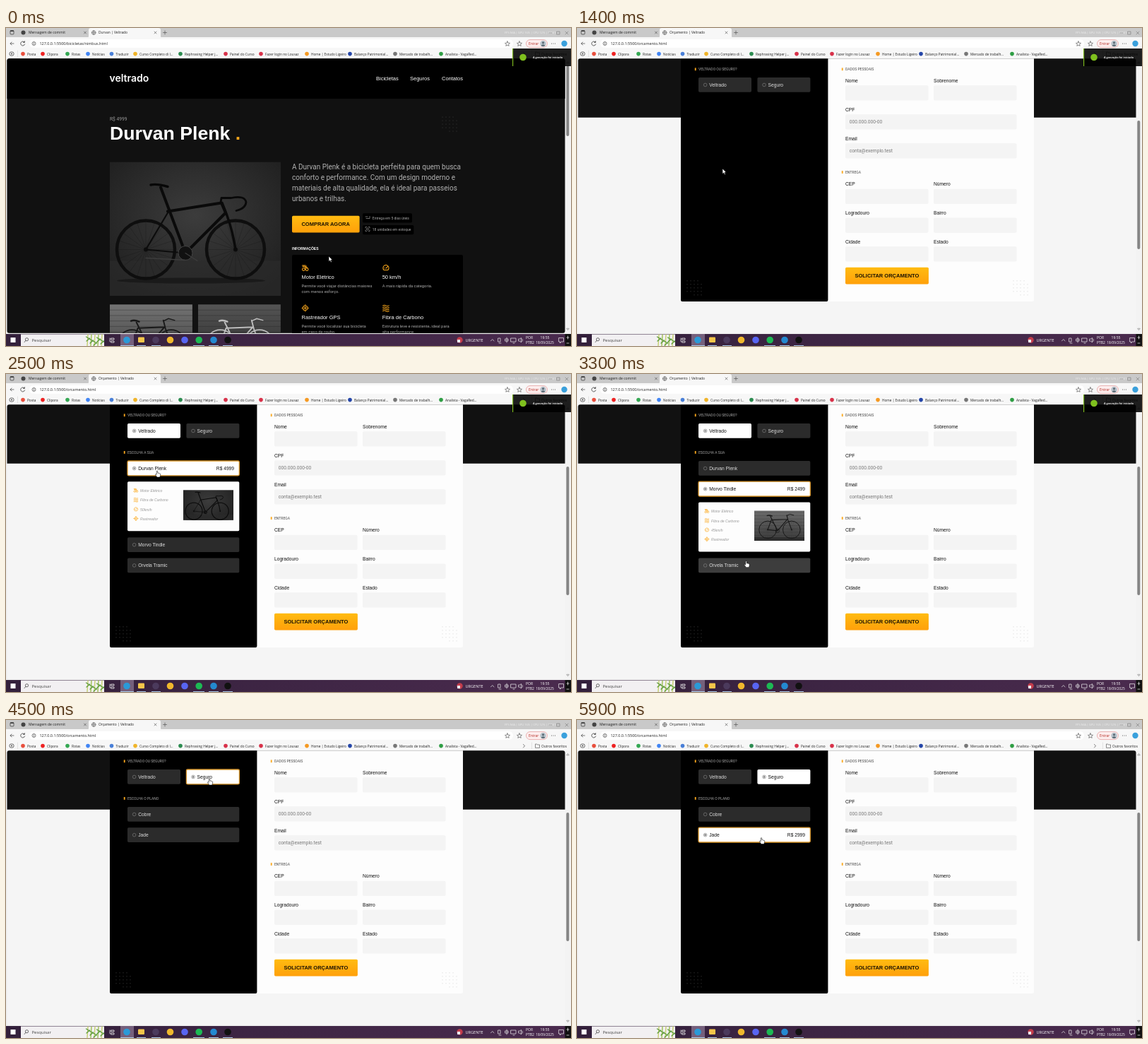
These frames come from a looping animation (800x450 px, 6 s). An HTML page:

```html
<!DOCTYPE html>
<html lang="pt-BR">
<head>
<meta charset="utf-8">
<title>Veltrado</title>
<style>
html, body { margin: 0; width: 100%; height: 100%; overflow: hidden; background: #f5f5f5; }
svg { display: block; width: 800px; height: 450px; }
svg svg { width: auto; height: auto; }
text { white-space: pre; }
.a { font-family: "Liberation Sans", Arial, sans-serif; }
.r { font-family: Roboto, sans-serif; }
.u { font-family: "Open Sans", sans-serif; }
.l { font-family: Inter, sans-serif; }
.b { font-weight: 700; }
.i { font-style: italic; }
</style>
</head>
<body>
<svg id="stage" viewBox="0 0 800 450"></svg>
<script>
const LOOP = 6000, TICK = 100, SCROLL = 166.7;
const GOLD = '#fba81c';

const rect = (x, y, w, h, fill, r = 0, more = '') =>
  `<rect x="${x}" y="${y}" width="${w}" height="${h}" rx="${r}" fill="${fill}" ${more}/>`;
const circ = (x, y, r, fill, more = '') => `<circle cx="${x}" cy="${y}" r="${r}" fill="${fill}" ${more}/>`;
const line = (d, color, w = 0.7, more = '') =>
  `<path d="${d}" fill="none" stroke="${color}" stroke-width="${w}" stroke-linecap="round" stroke-linejoin="round" ${more}/>`;
const text = (x, y, size, cls, fill, s, more = '') =>
  `<text x="${x}" y="${y}" font-size="${size}" class="${cls}" fill="${fill}" ${more}>${s}</text>`;
const at = (x, y, s, body) => `<g transform="translate(${x} ${y}) scale(${s})">${body}</g>`;

function dots(x, y, color) {
  let s = '';
  for (let r = 0; r < 5; r++)
    for (let c = 0; c < 5; c++)
      if (Math.abs(r - c) < 4 && !(r === 4 && c < 2)) s += circ(x + c * 5, y + r * 5, 0.55, color);
  return s;
}

// Small line icons: motor, speed, tracker, carbon
const GLYPHS = [
  'M1 2H6M3.5 2V4H6L9 6M1.5 4H3.5M1 8A2 2 0 1 0 5 8A2 2 0 1 0 1 8M6 8A2 2 0 1 0 10 8A2 2 0 1 0 6 8M5 6L7 3',
  'M2.5 9A4.3 4.3 0 1 1 8.5 9ZM5.5 6.5L8 3.8M3 6H3.4',
  'M2 5.5A3.5 3.5 0 1 0 9 5.5A3.5 3.5 0 1 0 2 5.5M5.5 .5V2M5.5 9V10.5M.5 5.5H2M9 5.5H10.5M4.3 5.5A1.2 1.2 0 1 0 6.7 5.5A1.2 1.2 0 1 0 4.3 5.5',
  'M1 2Q3.2 .5 5.5 2T10 2M1 4.7Q3.2 3.2 5.5 4.7T10 4.7M1 7.4Q3.2 5.9 5.5 7.4T10 7.4M1 10Q3.2 8.5 5.5 10T10 10'
];
const glyph = (n, x, y, s) => at(x, y, s, line(GLYPHS[n], GOLD, 1.1));

function wheel(x, y, r, color, w) {
  let d = '';
  for (let k = 0; k < 20; k++) {
    const a = k * Math.PI / 10;
    d += `M${x} ${y}L${(x + r * Math.cos(a)).toFixed(1)} ${(y + r * Math.sin(a)).toFixed(1)}`;
  }
  return line(d, color, 0.35, 'opacity=".6"') + circ(x, y, r, 'none', `stroke="${color}" stroke-width="${w}"`) + circ(x, y, 3, color);
}

const roadBike = rect(0, 0, 242, 190, 'url(#studio)') + rect(0, 140, 242, 50, '#2c2c2c', 0, 'opacity=".6"') +
  '<ellipse cx="115" cy="168" rx="105" ry="4" fill="#151515" opacity=".7"/>' +
  wheel(51, 124, 41, '#0e0e0e', 4.5) + wheel(178, 124, 41, '#0e0e0e', 4.5) +
  line('M51 124L82 72M51 124L107 129', '#0c0c0c', 2.2) +
  line('M72 36L107 129L164 72L158 58L82 70', '#0a0a0a', 4) + line('M159 58L166 76Q174 98 178 124', '#0a0a0a', 3.5) +
  line('M58 32.5Q66 30.5 82 35', '#070707', 3.4) +
  line('M157 57L158 51L172 51Q191 47 193 57Q192 66 179 69', '#090909', 2.8) +
  circ(107, 129, 10, '#111', 'stroke="#444" stroke-width="1"') + line('M107 129L124 140M51 136L107 139', '#3c3c3c', 1.3);

function cityBike(color, wall) {
  let boards = '';
  for (let y = -24; y < 150; y += 16) boards += `M0 ${y}H242`;
  return rect(0, -30, 242, 190, wall) + rect(0, -30, 242, 190, 'url(#shade)') + line(boards, '#222', 1.2, 'opacity=".6"') +
    rect(0, 128, 242, 34, '#2e2e2e') +
    wheel(65, 92, 42, color, 3.4) + wheel(180, 92, 42, color, 3.4) +
    line('M65 92L82 45L160 42L112 97ZM78 28L112 97M157 22L163 46L180 92', color, 4) +
    line('M62 24Q72 20 86 26', color, 5) + line('M157 24L172 17L190 22', color, 3.2) + circ(112, 97, 9, 'none', `stroke="${color}" stroke-width="2.5"`);
}
const darkBike = cityBike('#191919', '#757575'), lightBike = cityBike('#bdbdbd', '#555');
const photo = (x, y, w, h, s, dy, body) =>
  `<svg x="${x}" y="${y}" width="${w}" height="${h}" style="width:${w}px;height:${h}px">${at(0, dy, s, body)}</svg>`;

const nav = rect(0, 43, 800, 57, '#000') + text(146.5, 75.6, 14, 'l', '#fff', 'veltrado', 'font-weight="600"') +
  [['Bicicletas', 524], ['Seguros', 572], ['Contatos', 617]].map(([s, x]) => text(x, 74.4, 7.5, 'a', '#fff', s)).join('');

const orangeButton = (x, y, w, s) => rect(x, y, w, 23.8, 'url(#gold)', 1.7) + text(x + 13.4, y + 14.5, 7.5, 'a b', '#1c1403', s);

function productPage() {
  const intro = ['A Durvan Plenk é a bicicleta perfeita para quem busca', 'conforto e performance. Com um design moderno e',
    'materiais de alta qualidade, ela é ideal para passeios', 'urbanos e trilhas.'];
  const facts = [
    [0, 418.5, 334, 'Motor Elétrico', 'Permite você viajar distâncias maiores', 'com menos esforço.'],
    [1, 532.7, 334, '50 km/h', 'A mais rápida da categoria.', ''],
    [2, 418.5, 391, 'Rastreador GPS', 'Permite você localizar sua bicicleta', 'em caso de roubo.'],
    [3, 532.7, 391, 'Fibra de Carbono', 'Estrutura leve e resistente, ideal para', 'alta performance.']];
  const pill = (y, w, s, d) => rect(505, y, w, 13.2, '#000', 1.7) + line(d, '#999', 0.7) + text(518.8, y + 8.4, 5, 'r', '#aaa', s);
  return rect(0, 43, 800, 400, '#111') + nav + text(147, 130.8, 6.67, 'r', '#999', 'R$ 4999') +
    text(147, 158.4, 26.67, 'a b', '#fff', `Durvan Plenk <tspan fill="${GOLD}">.</tspan>`) + dots(618, 126, '#3d3d3d') +
    photo(147, 189.5, 242, 189.5, 1, 0, roadBike) +
    photo(147, 391, 117, 60, 0.483, 12, darkBike) + photo(272, 391, 117, 60, 0.483, 12, lightBike) +
    intro.map((s, i) => text(405, 200 + i * 15, 10, 'r', '#b2b2b2', s)).join('') +
    orangeButton(405, 265.7, 95.6, 'COMPRAR AGORA') +
    pill(262.3, 70, 'Entrega em 5 dias úteis', 'M509 267H512M510 269.5H515V266.5') +
    pill(279, 72.3, '18 unidades em estoque', 'M509 283V281.5H510.5M513.5 281.5H515V283M515 286V287.5H513.5M510.5 287.5H509V286M510.5 284.5A1.5 1.5 0 1 0 513.5 284.5A1.5 1.5 0 1 0 510.5 284.5') +
    text(405, 314, 5, 'a b', '#fff', 'INFORMAÇÕES') + rect(405, 321, 242, 130, '#000', 2) +
    facts.map(([n, x, y, h, p, q]) => glyph(n, x, y, 0.95) + text(x, y + 21, 7.5, 'a', '#fff', h) +
      text(x, y + 33, 5.83, 'r', '#aaa', p) + text(x, y + 41.3, 5.83, 'r', '#aaa', q)).join('');
}

const section = (x, y, s, color) => rect(x - 5.2, y - 1.9, 1.8, 3.8, GOLD) + text(x, y + 1.8, 5, 'r', color, s);
const field = (x, y, w, label, hint = '') => text(x, y - 4.3, 6.67, 'a', '#111', label) +
  rect(x, y, w, 21.2, '#f4f4f4', 1.7) + text(x + 5.8, y + 12.9, 6.67, 'r', '#777', hint);

function formPage() {
  const L = 380, R = 505, W = 117.5, F = 242.5;
  return rect(0, 43, 800, 800, '#f5f5f5') + rect(0, 43, 800, 250.4, '#111') + nav +
    text(147, 136, 10, 'r', '#999', 'COTAÇÕES NO SEU EMAIL', 'letter-spacing=".12"') +
    text(147, 165.6, 26.67, 'a b', '#fff', `Solicite um Orçamento<tspan fill="${GOLD}">.</tspan>`) + dots(618, 126, '#3d3d3d') +
    rect(147, 196.7, 500, 357, '#fdfdfd', 2) + rect(147, 196.7, 208.4, 357, '#000', 2) +
    section(L, 225, 'DADOS PESSOAIS', '#444') +
    field(L, 248, W, 'Nome') + field(R, 248, W, 'Sobrenome') +
    field(L, 289, F, 'CPF', '000.000.000-00') + field(L, 330, F, 'Email', 'conta@exemplo.test') +
    section(L, 370.7, 'ENTREGA', '#444') +
    field(L, 394.4, W, 'CEP') + field(R, 394.4, W, 'Número') +
    field(L, 435.2, W, 'Logradouro') + field(R, 435.2, W, 'Bairro') +
    field(L, 476, W, 'Cidade') + field(R, 476, W, 'Estado') +
    orangeButton(L, 505.4, 117.9, 'SOLICITAR ORÇAMENTO') +
    dots(156, 524.5, '#4a4a4a') + dots(618, 524.5, '#cfcfcf') + '<g id="choices"></g>';
}

const bookmarks = [
  [30, 'Posta', '#e8503e'], [58, 'Clipora', '#e22'], [93, 'Rotas', '#34a853'], [122, 'Notícias', '#4285f4'], [155.5, 'Traduzir', '#4a80d8'],
  [189, 'Curso Completo di I...', '#f0b429'], [253, 'Rephrasing Helper j...', '#2c8c50'], [317, 'Painel do Curso', '#d8324a'],
  [367, 'Fazer login no Lousaz', '#d8324a'], [432, 'Home | Estudo Ligeiro', '#f59a23'], [493, 'Balanço Patrimonial...', '#2546a8'],
  [557, 'Mercado de trabalh...', '#777'], [622, 'Analista - VagaRed...', '#2f9e44']];

function browser() {
  const ink = '#444';
  return rect(0, 0, 800, 14, '#c9c9c9') + rect(0, 13, 800, 31, '#f7f7f7') + rect(0, 43, 2, 390, '#eee') + rect(0, 431, 800, 2.5, '#eee') +
    rect(6, 3.5, 5, 5.5, 'none', 1, `stroke="${ink}" stroke-width=".8"`) + rect(6, 3.5, 5, 1.5, ink) +
    circ(24.5, 6.5, 3, '#444') + text(32, 8.4, 5, 'u', '#222', 'Mensagem de commit') + line('M110.5 5L113.5 8M113.5 5L110.5 8', ink, 0.6) +
    '<path d="M115 14Q117 14 117 11V3Q117 0 120 0H216Q219 0 219 3V11Q219 14 221 14Z" fill="#f7f7f7"/>' +
    circ(124.2, 6.6, 2.8, 'none', `stroke="${ink}" stroke-width=".6"`) + line('M121.4 6.6H127M124.2 3.8Q121.8 6.6 124.2 9.4Q126.6 6.6 124.2 3.8', ink, 0.5) +
    '<text id="tab" x="131" y="8.4" font-size="4.9" class="u" fill="#222"></text>' +
    line('M210 5L213 8M213 5L210 8M222.5 6.5H227.5M225 4V9', ink, 0.6) +
    text(706, 8.3, 4, 'u', '#eee', 'FPS N/A | GPU 16% | CPU 12% | RAM 5') +
    line('M769 7H773M780 5H784V9H780ZM792 5L796 9M796 5L792 9', '#777', 0.6) +
    line('M11 22H6M8 20L6 22L8 24', '#555', 0.8) + line('M26 20A3 3 0 1 0 26.6 23M26.3 18.7V20.4H24.6', '#333', 0.8) +
    rect(33, 16, 685, 12, '#fff', 6) + circ(39.5, 22, 2.5, 'none', `stroke="${ink}" stroke-width=".7"`) + line('M39.5 21.8V23.3M39.5 20.6V20.7', ink, 0.7) +
    '<text id="url" x="47.5" y="24.1" font-size="5.45" class="u" fill="#222"></text>' +
    line('M710 18.8L711 21.2L713.5 21.4L711.6 23L712.2 25.4L710 24.1L707.8 25.4L708.4 23L706.5 21.4L709 21.2ZM727 18.8L728 21.2L730.5 21.4L728.6 23L729.2 25.4L727 24.1L724.8 25.4L725.4 23L723.5 21.4L726 21.2Z', ink, 0.6) +
    rect(736.5, 16.6, 30, 11, '#fdeeee', 5.5, 'stroke="#d88" stroke-width=".6"') + text(740, 24, 5, 'u', '#b3261e', 'Entrar') +
    circ(760.5, 22.1, 4.3, '#b9c4cc') + circ(760.5, 20.8, 1.6, '#5c6a75') + '<path d="M757.5 25Q760.5 21.5 763.5 25Q760.5 27 757.5 25" fill="#5c6a75"/>' +
    [772.5, 775, 777.5].map(x => circ(x, 22, 0.55, ink)).join('') + circ(790.5, 22, 4.2, '#3aa0dc') +
    rect(5, 34, 6, 5, 'none', 2, `stroke="${ink}" stroke-width=".8"`) + circ(8, 36.5, 1, ink) + line('M16.5 32V41', '#ccc', 0.5) +
    bookmarks.map(([x, s, c]) => circ(x - 6, 36.6, 2.8, c) + text(x, 38.5, 4.75, 'u', '#222', s)).join('') +
    line('M732.5 34.5L734.5 36.7L732.5 39', ink, 0.7) + line('M744.5 32V41', '#ccc', 0.5) +
    line('M749.5 39V34H751.5L752.5 35H755.5V39Z', ink, 0.6) + text(758, 38.5, 4.75, 'u', '#222', 'Outros favoritos') +
    rect(791, 43, 9, 389, '#f3f3f3') + line('M794 49.5L795.5 47.5L797 49.5ZM794 425.5L795.5 427.5L797 425.5Z', '#777', 0.6) +
    '<rect id="thumb" x="793.3" width="4" rx="2" fill="#858585"/>';
}

function taskbar() {
  const w = '#eee';
  let leaves = '';
  for (let k = 0; k < 5; k++) {
    const x = 116 + k * 5, y = 437 + k * 3 % 8;
    leaves += line(`M${x} 434L${x - 1} 449.5`, k % 2 ? '#9cbf52' : '#c3cf6c', 1.4) + line(`M${x - 2.5} ${y}L${x + 2.5} ${y + 3}M${x + 2.5} ${y + 2}L${x - 2} ${y + 6}`, '#5a9a3a', 1.2);
  }
  return rect(0, 433, 800, 17, 'url(#bar)') + rect(6.5, 438, 7, 7, '#fff') + rect(21, 433.5, 118, 16.5, '#f2f0f2') +
    circ(29.5, 440.7, 2.1, 'none', 'stroke="#333" stroke-width=".7"') + line('M28 442.3L26 444.6', '#333') +
    text(36.5, 444, 6, 'u', '#444', 'Pesquisar') + leaves +
    line('M147 439V444M149 439H153V441H149ZM149 443H153V445H149Z', w, 0.8) +
    rect(162, 433, 19, 17, '#75607c') + rect(187, 437.5, 9, 7.5, '#f5c64a', 1) +
    [[171, '#2a9ad8'], [212, '#4b3a5c'], [232.5, '#f0b82d'], [253, '#5865f2'], [273.2, '#1db954'], [294, '#2489d0'], [314, '#111']]
      .map(([x, c]) => circ(x, 441.5, 4.8, c)).join('') +
    [[162, 19], [185, 13], [206, 13], [265, 16], [287, 14], [307, 14]].map(([x, l]) => rect(x, 449, l, 1, '#a9c8e6')).join('') +
    circ(642.5, 441.5, 4.2, '#c33d4c') + rect(639, 441, 4, 4, '#e9eef7') + text(650.5, 443.9, 5.6, 'u', '#fff', 'URGENTE') +
    line('M686.5 442.8L688.7 440.5L691 442.8M697 439H700V444H697ZM698 446H701M709 438V445M707 440H711V443H707ZM715 439H722V444H715ZM718 446H720M726 440H727.5L729.5 438.5V445L727.5 443H726ZM731 440Q732.4 441.7 731 443.5', w, 0.7) +
    text(736, 440.3, 5, 'u', '#fff', 'POR') + text(736, 447.4, 5, 'u', '#fff', 'PTB2') +
    text(763, 440.3, 5, 'u', '#fff', '19:55', 'text-anchor="middle"') + text(763, 447.4, 4.8, 'u', '#fff', '18/09/2025', 'text-anchor="middle"') +
    line('M783 438.5H789.5V444H786L784.5 446V444H783Z', w, 0.7) + rect(791.5, 433, 8.5, 17, '#111') +
    line('M795.5 436V440M794 438H797M794 446H797', '#ddd', 0.8);
}

const toast = rect(717, 29, 83, 25, '#000', 0, 'opacity=".88"') + rect(717, 29, 1.2, 25, '#7ab51d') +
  circ(732, 41.5, 4.8, '#7fc01e') + text(746, 43, 3.9, 'u', '#fff', 'A gravação foi iniciada', 'font-weight="600"');

const stage = document.getElementById('stage');
const grad = (id, a, b, dir) => `<linearGradient id="${id}" ${dir}><stop stop-color="${a}"/><stop offset="1" stop-color="${b}"/></linearGradient>`;
const down = 'x1="0" y1="0" x2="0" y2="1"';
stage.innerHTML = '<defs>' + grad('gold', '#ffbb11', '#ffa00a', down) + grad('shade', '#0000', '#0008', down) +
  grad('bar', '#33203b', '#4a2b4e', '') +
  '<radialGradient id="studio" cy=".4" r=".7"><stop stop-color="#3c3c3c"/><stop offset="1" stop-color="#1e1e1e"/></radialGradient>' +
  '<clipPath id="view"><rect x="1.5" y="43.2" width="790" height="388.5" rx="3"/></clipPath></defs>' + browser() +
  `<g clip-path="url(#view)"><g id="product">${productPage()}</g><g id="form">${formPage()}</g></g>` +
  taskbar() + `<g id="toast">${toast}</g><g id="pointer"></g>`;
const $ = id => document.getElementById(id);

const bikes = [['Durvan Plenk', 4999, 50, roadBike], ['Morvo Tindle', 2499, 45, darkBike], ['Orvela Tramic', 3999, 40, lightBike]];
const plans = [['Cobre', 1999], ['Jade', 2999]];

// Clicks: time, kind (0 bike, 1 insurance), chosen item
const clicks = [[0, -1, -1], [1800, 0, -1], [2400, 0, 0], [2900, 0, 1], [3600, 0, 2], [4500, 1, -1], [5200, 1, 0], [5700, 1, 1]];

const path = [[0, 457, 323], [300, 452, 281], [500, 452, 280], [800, 298.5, 297.5], [1400, 206, 199], [1700, 204, 83], [1900, 204, 83],
  [2300, 214, 137], [2500, 214, 137], [2800, 224, 240], [3000, 226, 241], [3400, 242, 269], [3900, 243.3, 268], [4400, 288, 84],
  [4600, 288, 82], [5000, 284, 130], [5200, 284, 130.5], [5600, 262, 163], [5900, 261, 166.5], [6000, 261, 166.5]];

const smooth = k => k * k * (3 - 2 * k);
const clamp = k => Math.max(0, Math.min(1, k));
function pointerAt(t) {
  const n = path.findIndex(p => p[0] > t), [t0, x0, y0] = path[n - 1], [t1, x1, y1] = path[n];
  const k = smooth((t - t0) / (t1 - t0));
  return [x0 + (x1 - x0) * k, y0 + (y1 - y0) * k];
}

function details(y, n) {
  const rows = ['Motor Elétrico', 'Fibra de Carbono', bikes[n][2] + 'km/h', 'Rastreador'];
  return rect(172, y, 158.3, 70, '#fdfdfd', 1.7) +
    rows.map((s, i) => glyph([0, 3, 1, 2][i], 180.5, y + 9 + i * 13.3, 0.62) + text(190, y + 15 + i * 13.3, 5.1, 'a i', '#999', s)).join('') +
    photo(251, y + 12, 71, 42.6, 0.2934, n ? 0 : -6.5, bikes[n][3]);
}

// Returns the markup and whether the pointer rests on a choice
function choices(kind, item, px, py) {
  let out = section(172, 225, 'VELTRADO OU SEGURO?', '#aaa'), over = false;
  const option = (x, y, w, name, on, focus, price) => {
    const hit = px > x && px < x + w && py > y && py < y + 20.8;
    over = over || hit;
    out += rect(x, y, w, 20.8, on ? '#fff' : hit ? '#3d3d3d' : '#2b2b2b', 1.7, focus ? 'stroke="#d8952a" stroke-width="1.3"' : '') +
      circ(x + 9.6, y + 10.5, 2.3, on ? '#fff' : 'none', `stroke="${on ? '#666' : '#888'}" stroke-width=".6"`) +
      (on ? circ(x + 9.6, y + 10.5, 1.1, '#555') : '') +
      text(x + 15.2, y + 12.6, 6.67, 'a', on ? '#111' : '#ddd', name) +
      (on && price ? text(323, y + 12.6, 6.67, 'a', '#111', 'R$ ' + price, 'text-anchor="end"') : '');
  };
  ['Veltrado', 'Seguro'].forEach((s, i) => option(172 + i * 83.4, 236.7, 75, s, kind === i, kind === i && item < 0));
  if (kind >= 0) {
    out += section(172, 277.6, kind ? 'ESCOLHA O PLANO' : 'ESCOLHA A SUA', '#aaa');
    let y = 289.7;
    (kind ? plans : bikes).forEach(([name, price], i) => {
      option(172, y, 158.3, name, item === i, item === i, price);
      y += 29.2;
      if (!kind && item === i) {
        out += details(y, i);
        y += 79;
      }
    });
  }
  return [out, over];
}

const arrow = '<path d="M0 0V7.4L1.8 5.8L3 8.4L4.2 7.9L3.1 5.3H5.3Z" fill="#fff" stroke="#000" stroke-width=".55"/>';
const hand = '<path d="M-.8 .6Q0 -.5 .8 .6V3.2Q2 2.8 2.3 3.5Q3.3 3.2 3.6 4Q4.6 3.8 4.7 4.8Q4.9 7 3.7 9H-.4Q-1 7.4 -2.5 5.6Q-2.6 4.4 -1.6 4.7L-.8 5.4Z" fill="#fff" stroke="#000" stroke-width=".55"/>';

function draw(t) {
  const onForm = t >= 600, [x, y] = pointerAt(t);
  const s = SCROLL * smooth(clamp((t - 800) / 500));
  const [, kind, item] = clicks.filter(c => c[0] <= t).pop();
  const [markup, over] = choices(kind, item, x, y + s);
  const onBuy = x > 405 && x < 500 && y > 266 && y < 289;
  $('product').style.display = onForm ? 'none' : '';
  $('form').style.display = onForm ? '' : 'none';
  $('form').setAttribute('transform', `translate(0 ${-s})`);
  $('choices').innerHTML = markup;
  $('tab').textContent = onForm ? 'Orçamento | Veltrado' : 'Durvan | Veltrado';
  $('url').textContent = '127.0.0.1:5500/' + (onForm ? 'orcamento.html' : 'bicicletas/nimbus.html');
  $('thumb').setAttribute('y', 53 + s * 0.468);
  $('thumb').setAttribute('height', onForm ? 182 : 100);
  $('toast').style.display = t < 4500 ? '' : 'none';
  $('pointer').innerHTML = (onForm ? over : onBuy) ? hand : arrow;
  $('pointer').setAttribute('transform', `translate(${x} ${y})`);
}

const start = performance.now();
let last = -1;
function loop() {
  const t = Math.floor((performance.now() - start) % LOOP / TICK) * TICK;
  if (t !== last) draw(last = t);
  requestAnimationFrame(loop);
}
loop();
</script>
</body>
</html>
```
